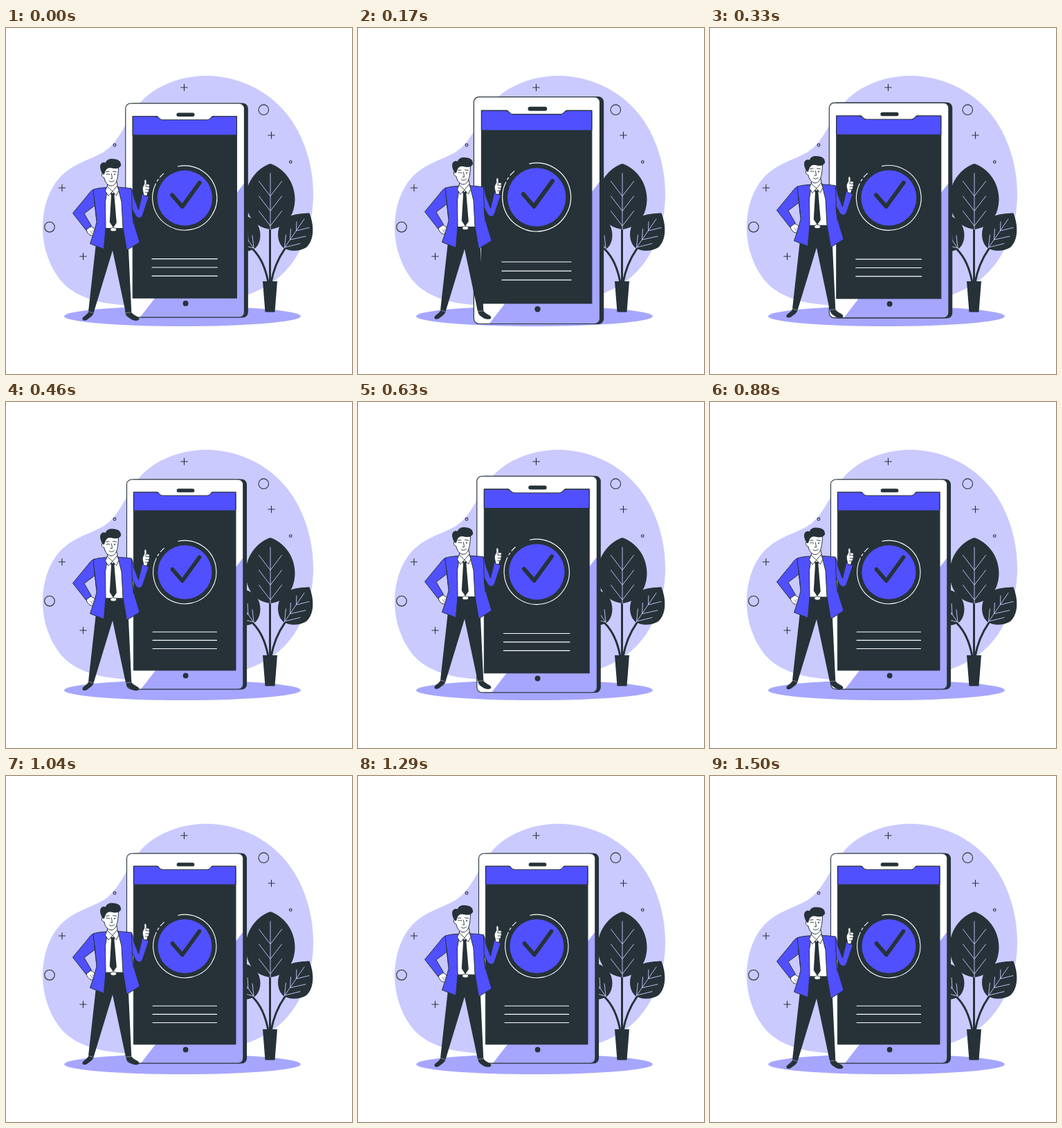
An HTML page with a canvas that plays this animation: 500x500 px, repeating every 1.54 s.

```html
<!DOCTYPE html>
<html lang="en">
<head>
<meta charset="utf-8">
<title>Confirmed</title>
<style>
  html, body { margin: 0; width: 100%; height: 100%; overflow: hidden; background: #fff; }
  canvas { display: block; width: 500px; height: 500px; }
</style>
</head>
<body>
<canvas id="stage"></canvas>
<script>
const SIZE = 500, LOOP = 1540, LEAD = 30;
const DARK = '#263238', BLUE = '#5050ff', MID = '#a6a6ff', PALE = '#cacaff', WHITE = '#fff';

const canvas = document.getElementById('stage');
const ctx = canvas.getContext('2d');
const ratio = window.devicePixelRatio || 1;
canvas.width = canvas.height = SIZE * ratio;
ctx.lineCap = ctx.lineJoin = 'round';

function paint(path, fill, stroke, width = 1) {
  if (fill) { ctx.fillStyle = fill; ctx.fill(path); }
  if (stroke) { ctx.strokeStyle = stroke; ctx.lineWidth = width; ctx.stroke(path); }
}
const shape = (d, fill, stroke, width) => paint(new Path2D(d), fill, stroke, width);

function box(x, y, w, h, r, fill, stroke, width) {
  const p = new Path2D();
  p.roundRect(x, y, w, h, r);
  paint(p, fill, stroke, width);
}
function disc(x, y, rx, fill, stroke, width, ry = rx) {
  const p = new Path2D();
  p.ellipse(x, y, rx, ry, 0, 0, Math.PI * 2);
  paint(p, fill, stroke, width);
}
function arc(x, y, r, from, to, stroke, width) {
  const p = new Path2D();
  p.arc(x, y, r, from * Math.PI / 180, to * Math.PI / 180);
  paint(p, null, stroke, width);
}

// Piecewise linear track through [time, value] pairs.
function track(keys, t) {
  const i = keys.findIndex(k => k[0] > t);
  if (i < 1) return keys[i < 0 ? keys.length - 1 : 0][1];
  const [t0, a] = keys[i - 1], [t1, b] = keys[i];
  return a + (b - a) * (t - t0) / (t1 - t0);
}
const BEAT = [[0, 1], [150, 1.1], [432, 1], [613, 1], [763, 1.1], [888, 1]];
const BOB = [[0, 0], [LOOP / 2, -9.8], [LOOP, 0]];

function drawBackdrop() {
  shape('M288 69C347 69 397 101 422 149C438 180 444 211 444 240C444 283 430 322 405 350' +
    'C378 379 340 392 295 399C250 405 200 404 165 400C130 397 104 388 87 373' +
    'C66 354 53 320 53 289C53 257 64 227 84 210C101 195 120 191 140 180' +
    'C166 164 172 134 193 109C211 87 248 69.5 288 69Z', PALE);
  disc(255, 416.5, 171, MID, null, 0, 14.5);
  for (const [x, y] of [[257.5, 86], [383.5, 155], [81, 231], [111.5, 330]])
    shape(`M${x - 4.7} ${y}h9.4M${x} ${y - 4.7}v9.4`, null, DARK, 1.1);
  for (const [x, y, r] of [[372.3, 118.2, 7.3], [63, 287.6, 7.3], [157, 169.3, 1.9], [411.3, 193.5, 1.8]])
    disc(x, y, r, null, DARK, 1.1);
}

function drawSideLeaf() {
  shape('M438.5 267.5C446 287 445 307 434 317C424 324 406 323 399 316C391 307 391 290 399 280' +
    'C408 269 425 268 438.5 267.5Z', DARK);
  shape('M402.5 317.5L431 276M404.5 299L402.5 317L425 311.5M411.5 290.5L410.5 306L433 301' +
    'M420 280L419.5 293L438 288.5', null, PALE, 0.9);
}

function drawPlant() {
  shape('M379 368C375 346 368 331 357 320M381.5 368V285M383 368C387 346 394 332 403 319', null, DARK, 3);
  ctx.save();
  ctx.translate(760.5, 1);
  ctx.scale(-1, 1);
  drawSideLeaf();
  ctx.restore();
  shape('M382 196C407 205 418 229 417.5 248C417 272 404 288 382 291C360 288 347 272 346.5 248' +
    'C346 229 357 205 382 196Z', DARK);
  let veins = 'M382 210V291';
  for (const y of [221.5, 243, 264.5]) veins += `M365.5 ${y}L382 ${y + 21.5}L398.5 ${y}`;
  shape(veins, null, PALE, 0.9);
  drawSideLeaf();
  shape('M371 366H392L388.5 410.5H374.5Z', DARK);
}

function drawPhone(scale) {
  ctx.save();
  ctx.translate(261, 263.3);
  ctx.scale(scale, scale);
  ctx.translate(-261, -263.3);
  box(178, 112, 169.5, 303, 7, DARK, DARK, 1.1);
  box(174.5, 112, 168.3, 303, 7, WHITE);
  shape('M195 415L342.8 225V408Q342.8 415 335.8 415Z', MID);
  box(174.5, 112, 168.3, 303, 7, null, DARK, 1.1);
  box(184.7, 130.3, 147.3, 257.5, 0, DARK, DARK, 1);
  box(185, 130.3, 146.7, 26.1, 0, BLUE);
  shape('M184.7 156.4V130.3H332V156.4', null, DARK, 1);
  shape('M217 129C223 129.8 220.5 135.2 227 135.2H290C296.5 135.2 294 129.8 300 129Z', WHITE);
  shape('M217 130.3C223 130.3 220.5 135.2 227 135.2H290C296.5 135.2 294 130.3 300 130.3', null, DARK, 1);
  box(246.7, 125.2, 25.6, 5.4, 2.7, DARK);
  disc(259.6, 395.4, 3.9, DARK);

  disc(258.4, 246, 39, BLUE);
  for (const [from, to] of [[-102, 206], [211, 215], [220, 229]])
    arc(258.3, 245.9, 45.7, from, to, WHITE, 1.1);
  shape('M240.5 241.8L254.8 258.3L279.5 224.3', null, DARK, 5.6);
  shape('M212 332.3H304.5M212 344.4H304.5M212 356.5H304.5', null, WHITE, 1.1);
  ctx.restore();
}

function drawHead() {
  shape('M147 222L146 234L154 240L162 233L160 222Z', WHITE, DARK);
  shape('M141 201C140 205 141 208 141.5 210C137 208 137.5 216 142 217C143 223 147 228.5 152 228.5' +
    'C159 228.5 162 219 162.5 203Z', WHITE, DARK);
  shape('M140 212C136 206 134.5 199 138 196C140 194 143 195 144 195C146 189 153 189 158 190' +
    'C163 191 166 194 165.5 196C168 199 164 204 157 203.5C152 203 148 201 145 205C143 207 143 210 142 212Z', DARK);
  shape('M144.5 208.3L149 207.8M154.5 207.6L159.5 208.3M145 211.8Q147.5 210.5 150 212' +
    'M152.5 211L153.5 217.8H151M149 221.3Q152.5 224.6 156.5 220.8', null, DARK, 0.9);
  disc(157, 212, 1, DARK);
}

function drawMan(dy) {
  ctx.save();
  ctx.translate(0, dy);

  // Shoes and trousers
  shape('M119.5 410L127 412C125 417 121 419 118.5 421C115 424 110 424 110.5 420.5C111 417 117 416 119.5 410Z', DARK);
  shape('M173 411L181 410.5C183 416 192 416.5 192.5 421C192 424.5 184 423.5 181 421.5C178 419 174 418 173 411Z', DARK);
  shape('M142 288H172L177 320L181.3 411.5L173 412L154 322L126.5 412.5L119 410.5L130 312Z', DARK);
  shape('M119.4 410.3L126.5 412.6M173 412L181 411.3', null, WHITE, 0.4);

  // Shirt, tie and buckle
  shape('M146 231L162 231L170 250V290H142V250Z', WHITE, DARK);
  shape('M150.5 237H157.5L156.5 243L159.8 282L155 289L149.8 281L152 243Z', DARK);
  disc(155.2, 291.6, 4.4, WHITE, DARK, 0.8, 2.6);

  // Raised arm
  shape('M179 232C183 231 183 238 185 246L191.5 263L197 240L206.3 244.5L198 269' +
    'C196 277 190 276 187 271L179 256Z', BLUE, DARK);
  // Bent arm
  shape('M127 233.5C123 235 121 238 118 242L96.5 268L116 293L123.5 286.5L113 268.5L131 255Z', BLUE, DARK);
  shape('M116.5 291.5L122 287.5C126 288 129 291 128.5 294L130 298C128 301 124 301 121 299.5C118 297 116 294 116.5 291.5Z', WHITE, DARK);
  shape('M122 294L126.5 299M125 293L129 297', null, DARK, 0.7);

  // Jacket
  shape('M146.5 231C139 231 131 232 126 234L131 281C128 293 125 302 121.5 312L141.5 320L144 290L143.5 252Z', BLUE, DARK);
  shape('M162 230.5C170 231 177 231.5 181.5 232.5L182.5 270C185 286 190 298 193 310L174.5 321.5L169 289L167 252Z', BLUE, DARK);
  shape('M128 251L130.5 274M182.5 262L184 283', null, DARK, 0.9);

  drawHead();
  shape('M146 229.5L143.5 236L148 243L153.8 236.5L160.5 228.5L163 235L159.5 242.5L153.8 236.5Z', WHITE, DARK, 0.9);

  // Thumbs up
  shape('M199 242L197.3 234C196.5 230 199.5 228 200 225C199.5 221 200 219 201.5 219.3' +
    'C203.8 220 203 224 203 226H206C208 227 207.5 229 206.8 230C208 232 207.3 233.5 206.3 234' +
    'C207 236.5 206 237.5 205 238L203.5 243Z', WHITE, DARK, 0.9);
  shape('M202 226.2V229.7H206.8M202 233.8H206.3M201.5 237.8H205', null, DARK, 0.8);
  ctx.restore();
}

function draw(now) {
  const t = (now + LEAD) % LOOP;
  ctx.setTransform(ratio, 0, 0, ratio, 0, 0);
  ctx.fillStyle = WHITE;
  ctx.fillRect(0, 0, SIZE, SIZE);
  drawBackdrop();
  drawPlant();
  drawPhone(track(BEAT, t));
  drawMan(track(BOB, t));
}

let start;
function frame(now) {
  start ??= now;
  draw(now - start);
  requestAnimationFrame(frame);
}
draw(0);
requestAnimationFrame(frame);
</script>
</body>
</html>
```
